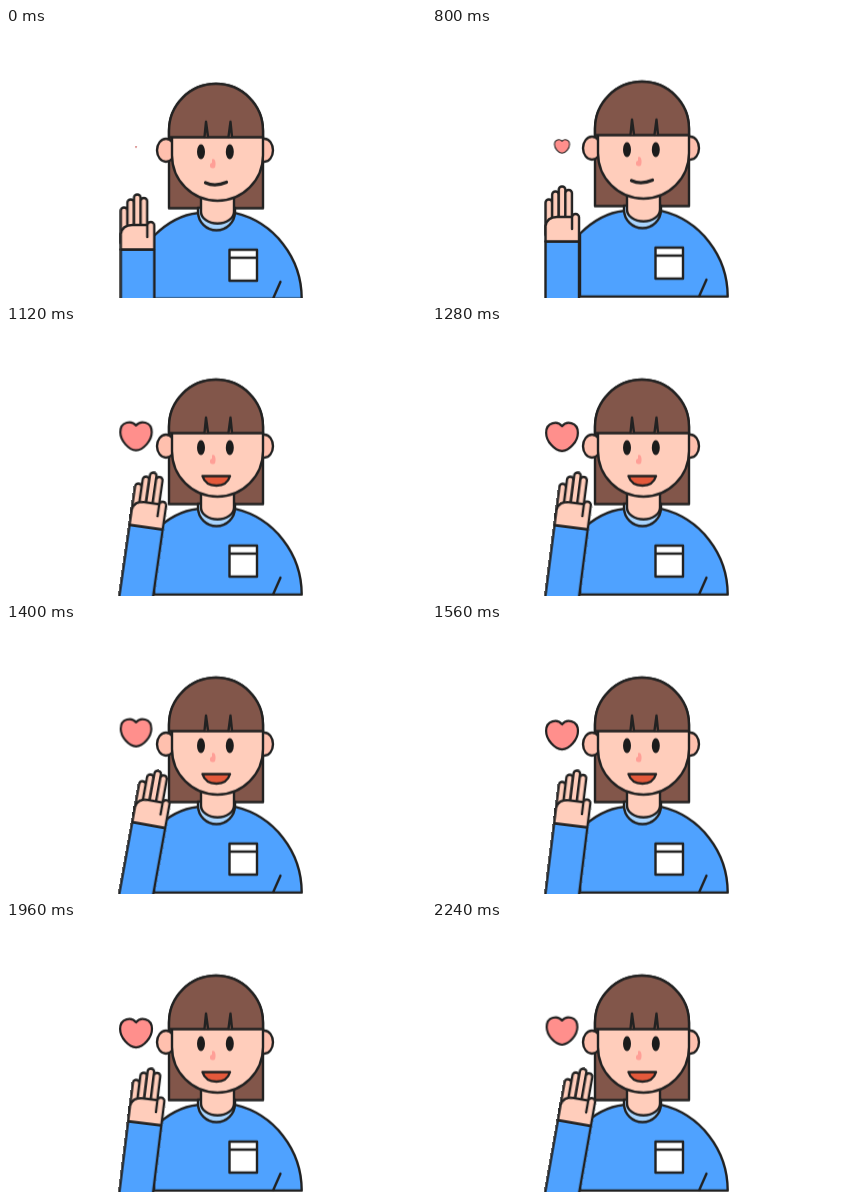
An HTML page for the animation above (2280 ms loop, 420x270 px).

```html
<!DOCTYPE html>
<html lang="en">
<head>
<meta charset="utf-8">
<title>Waving girl</title>
<style>
  html, body { margin: 0; width: 100%; height: 100%; overflow: hidden; background: #fff; }
  svg { display: block; width: 420px; height: 270px; }
  .line { stroke: #222; stroke-width: 2.4px; stroke-linecap: round; stroke-linejoin: round; }
  .none { fill: none; }
  .skin { fill: #ffcdbb; }
  .ear { fill: #ffc0ae; }
  .hair { fill: #82564a; }
  .blue { fill: #4fa2ff; }
  .white { fill: #fff; }

  .body, .arm, .heart, .shut, .open { animation: 2280ms linear infinite; }
  .body { animation-name: rise; animation-timing-function: step-end; }
  .shut { animation-name: shut; animation-timing-function: step-end; stroke-width: 3.2px; }
  .open { animation-name: open; animation-timing-function: step-end; }
  .arm { animation-name: wave; transform-origin: 131px 270px; }
  .heart { animation-name: beat; }
  .heart .line { stroke-width: 2.1px; }

  @keyframes rise {
    0% { transform: translateY(1.7px); }
    35.087%, 100% { transform: translateY(-.4px); }
  }
  @keyframes shut {
    0% { visibility: visible; }
    38.596%, 100% { visibility: hidden; }
  }
  @keyframes open {
    0% { visibility: hidden; }
    38.596%, 100% { visibility: visible; }
  }
  /* Rest, pop up, then sway with a 400 ms period */
  @keyframes wave {
    0%, 35.086% { transform: rotate(0deg) translate(.3px, 0); }
    35.087% { transform: rotate(0deg) translate(-1px, -8px); }
    44.518%, 62.061%, 79.605%, 97.149% {
      transform: rotate(10.3deg) translate(-1px, -21.5px);
      animation-timing-function: cubic-bezier(.37, 0, .63, 1);
    }
    53.289%, 70.833%, 88.377% {
      transform: rotate(6.4deg) translate(-1px, -20.5px);
      animation-timing-function: cubic-bezier(.37, 0, .63, 1);
    }
    100% { transform: rotate(9.4deg) translate(-1px, -21.3px); }
  }
  @keyframes beat {
    0%, 35.086% { transform: translate(130px, 119px) scale(.06); }
    35.087% { transform: translate(130px, 118.5px) scale(.5); }
    44.518%, 62.061%, 79.605%, 97.149% {
      transform: translate(130px, 108.8px) scale(1.02);
      animation-timing-function: cubic-bezier(.37, 0, .63, 1);
    }
    53.289%, 70.833%, 88.377% {
      transform: translate(130px, 111.7px) scale(1.07);
      animation-timing-function: cubic-bezier(.37, 0, .63, 1);
    }
    100% { transform: translate(130px, 109.5px) scale(1.03); }
  }
</style>
</head>
<body>
<svg viewBox="0 0 420 270">
  <g class="body">
    <path class="line hair" d="M163 178.500V101a47 47 0 0 1 94 0V178.500Z"/>

    <!-- torso -->
    <path class="line blue" d="M148 269V206C158 196 174 185 192 183.200H229A86 88 0 0 1 295.700 269Z"/>
    <path class="line none" d="M274.500 252 267 269"/>
    <path class="line white" d="M223.500 220H251V251H223.500ZM223.500 228H251"/>

    <!-- collar and neck -->
    <path class="line" fill="#a9d5ff" d="M192 178V182a18.500 18.500 0 0 0 37 0V178Z"/>
    <path class="line skin" d="M195 166V182a16.500 11.800 0 0 0 33 0V166Z"/>

    <!-- head -->
    <ellipse class="line ear" cx="160" cy="120.500" rx="9" ry="11.500"/>
    <ellipse class="line ear" cx="258.500" cy="120.500" rx="8.500" ry="11.500"/>
    <path class="line skin" d="M166 107V125.500a45.500 45.500 0 0 0 91 0V107Z"/>
    <path class="line hair" d="M163 107.500V101a47 47 0 0 1 94 0V107.500Z"/>
    <path class="line hair" d="M198.500 107 200 92 202 107M222.500 107 224.500 92 226 107"/>

    <!-- face -->
    <ellipse cx="195" cy="122" rx="4" ry="7.500" fill="#1c1c1c"/>
    <ellipse cx="223.800" cy="122" rx="4" ry="7.500" fill="#1c1c1c"/>
    <path fill="#ff9f97" d="M206 129.500Q209 128 209.500 133Q210 138.500 207 138.500Q203.500 138.500 204 135Q204 133.500 206 133Z"/>
    <path class="shut line none" d="M199.500 153Q209 157.500 220.500 152.500"/>
    <path class="open line" fill="#e4593b" d="M196.500 150.500H224C222 157 217 160 210.500 160S198.500 157 196.500 150.500Z"/>
  </g>

  <g class="heart">
    <path class="line" fill="#ff8f8c"
      d="M0-10.300C-4-15.500-15-14.500-15-4C-15 4-7 13 0 13.300C7 13 15 4 15-4C15-14.500 4-15.500 0-10.300Z"/>
  </g>

  <g class="arm">
    <path class="line blue" d="M114.500 221.500H148V330H114.500Z"/>
    <g class="line skin">
      <rect x="114.500" y="179.500" width="6.600" height="38" rx="3.300"/>
      <rect x="121.100" y="171.500" width="6.600" height="40" rx="3.300"/>
      <rect x="127.700" y="166.500" width="6.600" height="40" rx="3.300"/>
      <rect x="134.300" y="170" width="6.600" height="40" rx="3.300"/>
    </g>
    <path class="skin" d="M114.500 221.500V206Q116 197 126 197H141a3.500 3.500 0 0 1 7 0V221.500Z"/>
    <path class="line none" d="M114.500 221.500V206Q116 197 126 197H141M141 209V197.500a3.500 3.500 0 0 1 7 0V221.500H114.500"/>
  </g>
</svg>
</body>
</html>
```
